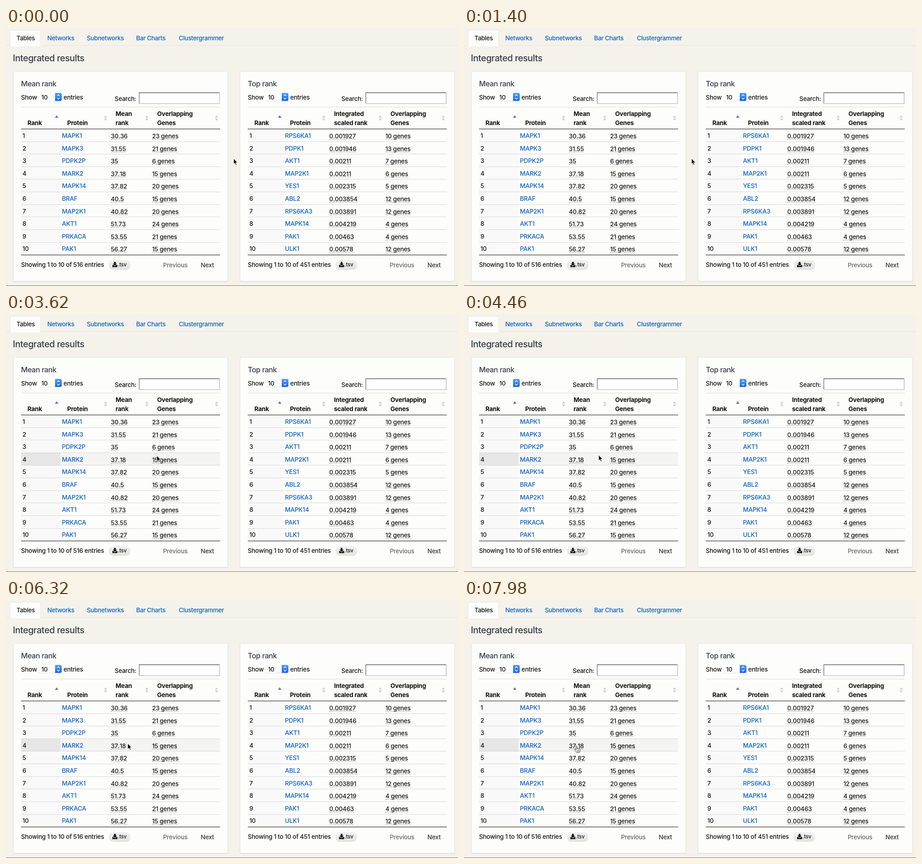
An HTML page for the animation above (8 s loop, 990 by 566 pixels).

```html
<!DOCTYPE html>
<html lang="en">
<head>
<meta charset="utf-8">
<title>Integrated results</title>
<style>
  html, body { margin: 0; width: 100%; height: 100%; overflow: hidden; background: #f4f2eb; }
  #stage { position: relative; width: 990px; height: 566px; overflow: hidden;
    font: 450 13.4px/20px Inter, "Open Sans", sans-serif; letter-spacing: -.017em; color: #141414; }
  svg { position: absolute; left: 0; top: 0; }
  .t { position: absolute; white-space: pre; transform: translateY(-50%); }
  .link { color: #0a60c8; }
  .tab { letter-spacing: -.025em; }
  .title { font-size: 19.5px; font-weight: 500; letter-spacing: -.02em; color: #343c46; }
  .name { font-size: 16px; font-weight: 500; letter-spacing: -.025em; color: #343c46; }
  .head { font-weight: 700; color: #111; }
  .abbr { line-height: 14px; border-bottom: 1px dotted #666; font-kerning: none; }
  .muted { color: #666; }
  .next { color: #333; }
  .small { font-size: 11.5px; font-weight: 500; }
</style>
</head>
<body>
<div id="stage">
  <svg id="shapes" width="990" height="566">
    <defs>
      <linearGradient id="button" x2="0" y2="1">
        <stop stop-color="#f2f2f2"/><stop offset="1" stop-color="#e2e2e2"/>
      </linearGradient>
      <linearGradient id="blue" x2="0" y2="1">
        <stop stop-color="#4d9bf8"/><stop offset="1" stop-color="#1464ee"/>
      </linearGradient>
    </defs>
  </svg>
  <div id="texts"></div>
  <svg id="pointer" width="990" height="566">
    <path id="arrow" d="M0 0V12.3L2.8 9.7L4.8 14.2L6.8 13.3L4.8 8.9H8.6Z" fill="#000" stroke="#fff" stroke-width=".9"/>
    <g id="hand" stroke="#222" stroke-width=".9" stroke-linejoin="round">
      <path fill="#fff" d="M-1.2 1.2Q0 -.4 1.2 1.2L2 6Q3.4 5 4.2 6.4Q5.5 5.5 6.3 6.9Q8 6.2 8.2 8.2V11L7.2 15H.3L-1 12.3L-3.8 9Q-3.7 7.5 -2 8L-.2 9.5Z"/>
      <path fill="none" d="M2 6L2.4 8M4.2 6.5L4.5 8.2M6.3 7L6.4 8.4M2 10.3V13M4 10.3V13M5.8 10.3V13"/>
    </g>
  </svg>
</div>
<script>
const byId = id => document.getElementById(id);
const shapes = byId('shapes'), texts = byId('texts');

function shape(tag, attrs) {
  const node = document.createElementNS('http://www.w3.org/2000/svg', tag);
  for (const key in attrs) node.setAttribute(key, attrs[key]);
  return shapes.appendChild(node);
}
const rect = (x, y, width, height, fill, more) => shape('rect', { x, y, width, height, fill, ...more });
const path = (d, fill, more) => shape('path', { d, fill, ...more });

// y is the vertical middle of the capitals
function text(x, y, string, cls = '') {
  const node = document.createElement('div');
  node.className = 't ' + cls;
  node.style.left = x + 'px';
  node.style.top = y + 'px';
  node.textContent = string;
  texts.append(node);
}

const ROW_TOP = 222, ROW_HEIGHT = 27.62, ROWS = 10;
const rowEdge = i => ROW_TOP + i * ROW_HEIGHT;
const hoverRow = [];

function drawCard(x, data) {
  const left = x + 17.5, width = 436;
  rect(x, 95, 471, 462, '#e3e1da', { rx: 4 });
  rect(x + .5, 95, 470, 460.5, '#fdfdfc', { rx: 3.5, stroke: '#dedcd6', 'stroke-width': .8 });
  text(left, 122, data.name, 'name');

  text(left, 152, 'Show');
  rect(x + 55, 143, 51, 17.5, '#e0e0e0', { rx: 3.5 });
  rect(x + 55, 142.5, 51, 17, '#fff', { rx: 3.5 });
  path(`M${x + 92} 142.5h11q3.5 0 3.5 3.5v10.5q0 3.5 -3.5 3.5h-11z`, 'url(#blue)');
  path(`M${x + 96.4} 149.3l2.8 -3l2.8 3m0 4l-2.8 3l-2.8 -3`, 'none', { stroke: '#fff', 'stroke-width': 1.3 });
  text(x + 62, 152, '10');
  text(x + 110.5, 152, 'entries');
  text(x + 222.5, 154.5, 'Search:');
  rect(x + 275.5, 141, 177.5, 25.5, '#c3c3c8');
  rect(x + 275.5, 141, 176, 24, '#85858a');
  rect(x + 277, 143, 174.5, 22, '#fff');

  rect(left, 173, width, 1, '#dddbe2');
  rect(left, ROW_TOP, data.rankWidth, ROW_HEIGHT * ROWS, '#f9f9f9');
  if (data.hover) hoverRow.push(
    rect(left, 0, width, ROW_HEIGHT, '#f4f4f3'),
    rect(left, 0, data.rankWidth, ROW_HEIGHT, '#e6e6e6'));
  for (let i = 1; i < ROWS; i++) rect(left, Math.round(rowEdge(i)) - 1, width, 1, '#d8d7d9');
  for (const y of [220.8, 497.2]) rect(left, y, width, 1.4, '#4a4a4a');

  data.heads.forEach(([hx, ...lines]) => lines.forEach(
    (line, i) => text(hx, 208 - 20 * (lines.length - 1 - i), line, 'head')));
  data.sorts.forEach((sx, i) => {
    if (i === 0) return path(`M${sx} 191.3l3.8 5.7h-7.6z`, '#7470c4');
    path(`M${sx} 191.6l3.5 5h-7zM${sx} 203.4l3.5 -5h-7z`, '#cfcfcf');
  });
  data.rows.split(' ').forEach((row, i) => {
    const [protein, score, genes] = row.split(',');
    const y = Math.round(236 + i * 27.6), [a, b, c, d] = data.columns;
    text(a, y, i + 1);
    text(b, y, protein, 'link');
    text(c, y + .5, score, 'abbr');
    text(d, y + .5, genes + ' genes', 'abbr');
  });

  text(left, 519, `Showing 1 to 10 of ${data.total} entries`);
  rect(x + 210, 509, 47, 21.5, 'url(#button)', { rx: 9 });
  path(`M${x + 221.1} 513h3.8v4h2.8l-4.7 4.6l-4.7 -4.6h2.8z`, '#111');
  path(`M${x + 217.5} 520h2.5l3 2.7l3 -2.7h2.5v4.5h-11z`, '#111');
  text(x + 229.5, 519, '.tsv', 'small');
  text(x + 328.5, 519.5, 'Previous', 'muted');
  text(x + 411, 519.5, 'Next', 'next');
}

rect(0, 38, 990, 1, '#e8e1da');
path('M9 39V8q0 -3 3 -3H73q3 0 3 3V39z', '#fdfdfc', { stroke: '#e3e0d9', 'stroke-width': .8 });
rect(9, 38, 67, 2, '#fdfdfc');
text(23, 22, 'Tables', 'tab');
[[90.5, 'Networks'], [177, 'Subnetworks'], [285, 'Bar Charts'], [378.5, 'Clustergrammer']]
  .forEach(([x, label]) => text(x, 22, label, 'link tab'));
text(15, 66, 'Integrated results', 'title');

drawCard(15.5, {
  name: 'Mean rank', total: 516, rankWidth: 86, hover: true,
  heads: [[47, 'Rank'], [134, 'Protein'], [240, 'Mean', 'rank'], [331, 'Overlapping', 'Genes']],
  sorts: [111, 218, 308.5, 461],
  columns: [36, 122.5, 229.5, 320],
  rows: 'MAPK1,30.36,23 MAPK3,31.55,21 PDPK2P,35,6 MARK2,37.18,15 MAPK14,37.82,20 ' +
    'BRAF,40.5,15 MAP2K1,40.82,20 AKT1,51.73,24 PRKACA,53.55,21 PAK1,56.27,15'
});
drawCard(512, {
  name: 'Top rank', total: 451, rankWidth: 78,
  heads: [[544, 'Rank'], [622, 'Protein'], [718.5, 'Integrated', 'scaled rank'], [842, 'Overlapping', 'Genes']],
  sorts: [599.5, 696, 819.5, 957.5],
  columns: [533, 611, 708, 831],
  rows: 'RPS6KA1,0.001927,10 PDPK1,0.001946,13 AKT1,0.00211,7 MAP2K1,0.00211,6 YES1,0.002315,5 ' +
    'ABL2,0.003854,12 RPS6KA3,0.003891,12 MAPK14,0.004219,4 PAK1,0.00463,4 ULK1,0.00578,12'
});
rect(0, 565, 990, 1, '#6b6b69');

const easeIn = u => u * u, easeOut = u => u * (2 - u), smooth = u => u * u * (3 - 2 * u);
// time, x, y, easing towards this point
const route = [
  [0, 498.5, 286.5],
  [1950, 498.5, 286.5, smooth],
  [2680, 460, 315.5, easeIn],
  [4430, 295, 309.5, easeOut],
  [5550, 281, 310.5, smooth],
  [5750, 281, 310.5, smooth],
  [6900, 252, 319.5, smooth],
  [7200, 252, 319.5, smooth],
  [7900, 246, 319.5, smooth],
  [8000, 246, 319.5, smooth]
];

function pointerAt(time) {
  const i = route.findIndex(point => point[0] > time);
  const [t0, x0, y0] = route[i - 1], [t1, x1, y1, ease] = route[i];
  const u = ease((time - t0) / (t1 - t0));
  return [x0 + (x1 - x0) * u, y0 + (y1 - y0) * u];
}

function draw() {
  const [x, y] = pointerAt(performance.now() % 8000);
  const row = Math.floor((y - ROW_TOP) / ROW_HEIGHT);
  const overTable = x >= 33 && x <= 469;
  hoverRow.forEach(node => {
    node.setAttribute('y', rowEdge(row));
    node.setAttribute('visibility', overTable ? 'visible' : 'hidden');
  });
  const overValue = x >= 229 && x <= 262;
  for (const id of ['arrow', 'hand']) {
    byId(id).setAttribute('transform', `translate(${x} ${y})`);
    byId(id).setAttribute('visibility', (id === 'hand') === overValue ? 'visible' : 'hidden');
  }
  requestAnimationFrame(draw);
}
draw();
</script>
</body>
</html>
```
